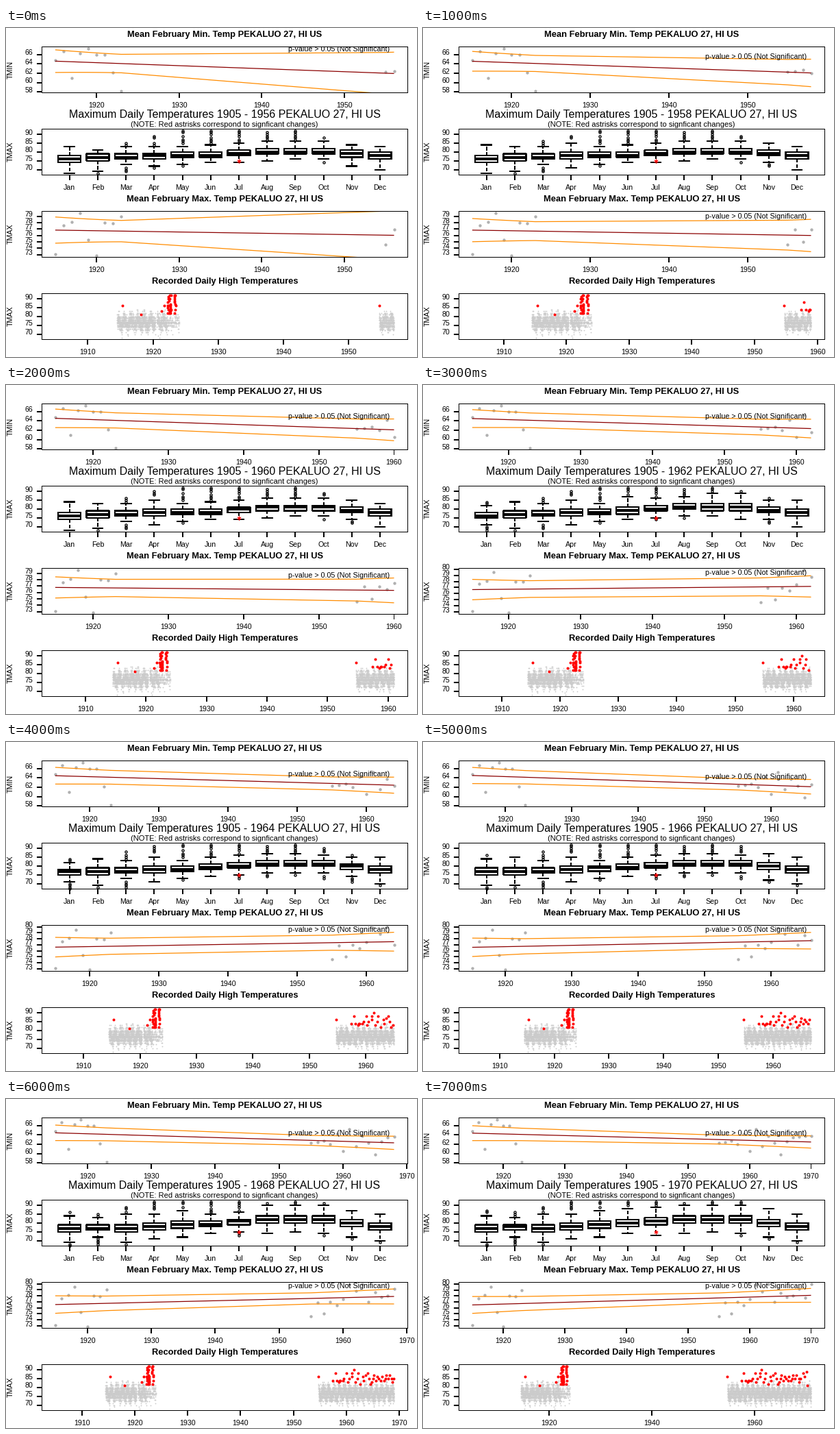
A matplotlib script that plays this animation: 600 by 480 pixels, repeating every 8000 ms.

```python
import numpy as np
import matplotlib.pyplot as plt
from matplotlib.animation import FuncAnimation
from matplotlib.patches import Rectangle

W, H, DPI = 600, 480, 100
PT = 72 / DPI  # points per pixel
LEFT, RIGHT, TALL = 52.5, 586.5, 67
X0, X1 = 71.9, 566.5  # data span inside the 4 % padding
PLACE = "PEKALUO 27, HI US"
MONTHS = "Jan Feb Mar Apr May Jun Jul Aug Sep Oct Nov Dec".split()

plt.rcParams["font.family"] = "Liberation Sans"
plt.rcParams["path.snap"] = False

fig = plt.figure(figsize=(W / DPI, H / DPI), dpi=DPI, facecolor="white")
ax = fig.add_axes([0, 0, 1, 1])


def bump(x, centre, width):
    return np.exp(-((x - centre) / width) ** 2)


# February means: nine early readings, then rules for the later years
K = np.arange(16)
FEB_YEARS = np.concatenate([np.arange(1915, 1924), 1955 + K])
TMIN = np.concatenate([
    [64.8, 66.7, 61, 66.2, 67.3, 66, 65.9, 62.1, 58.2],
    62.3 + 0.1 * K + 2.4 * (-1.0) ** K * bump(K, 5.5, 2.2) - 3.6 * bump(K, 10, 0.8)])
TMAX = np.concatenate([
    [73.1, 77.6, 78.1, 79.5, 75.3, 72.9, 78, 77.9, 79],
    75.6 + 0.22 * K + 1.1 * np.cos(6 * np.pi * (K - 1) / 7) + 2.7 * bump(K, 6.7, 1.7)])


def daily_readings():
    rng = np.random.default_rng(7)
    t = np.concatenate([np.arange(1914.5, 1924, 1 / 365),
                        np.arange(1954.75, 1971, 1 / 365)])
    season = 1.5 * np.cos(2 * np.pi * (t - 0.62))
    v = np.round(76.8 + season + rng.normal(0, 2.2, t.size)).clip(67, 84)
    sparse = (t > 1922.1) & (t < 1930)
    keep = np.where(sparse, 0.25, 0.75) > rng.random(t.size)
    keep &= ~((t > 1920.35) & (t < 1920.6))
    return t[keep], v[keep]


def record_highs():
    rng = np.random.default_rng(3)
    lone = [(1915.35, 86), (1918.1, 81), (1921.3, 83), (1921.75, 86), (1954.7, 86)]
    hot = [(c + rng.uniform(-0.04, 0.04), v)
           for c in (1922.3, 1922.42, 1922.55, 1922.7, 1923.3, 1923.45)
           for v in range(82, 93) if rng.random() < 0.5]
    late = [(t, round(rng.triangular(81, 85, 90)))
            for t in np.linspace(1957.6, 1970.3, 44) + rng.uniform(-0.2, 0.2, 44)]
    return np.array(lone + hot + late).T


DAY_T, DAY_V = daily_readings()
HIGH_T, HIGH_V = record_highs()
PRESENT = np.random.default_rng(5).random((12, 100)) < 0.82


def text(x, y, s, size, **kw):
    kw = {"ha": "center", "va": "baseline", **kw}
    return ax.text(x, y, s, fontsize=size * PT, **kw)


def line(x, y, color="black", width=1, aa=False, **kw):
    kw = {"solid_capstyle": "butt", **kw}
    return ax.plot(x, y, color=color, lw=width * PT, aa=aa, **kw)[0]


def dots(x, y, color, size):
    return ax.plot(x, y, "o", color=color, ms=size * PT, mew=0)[0]


def panel(top, label):
    """Draw the frame of a panel and return it for clipping."""
    box = Rectangle((LEFT, top + 0.5), RIGHT - LEFT, TALL, fill=False,
                    lw=PT, ec="black", aa=False, zorder=5)
    ax.add_patch(box)
    text(11.5, top + 33.5, label, 10.6, rotation=90, va="center", ha="right")
    return box


def x_axis(top, ticks, labels):
    for x, s in zip(ticks, labels):
        line([x, x], [top + 67.5, top + 74.5])
        text(x, top + 89, s, 10.6)


def value_axis(top, lo, hi, ticks):
    """Ticks on the left side; returns the mapping to pixels."""
    to_y = lambda v: top + 64.8 - (v - lo) * 61.9 / (hi - lo)
    for v in ticks:
        y = to_y(v)
        line([45.5, LEFT], [y, y])
        text(39, y + 0.6, str(v), 10.6, ha="right")
    return to_y


def year_axis(top, first, last):
    """Decade ticks over the padded range; returns the mapping to pixels."""
    scale = (X1 - X0) / (last - first)
    pad = 0.04 * (last - first)
    raw = (last - first + 2 * pad) / 5
    step = 20 if 20 - raw < 1.5 * (raw - 10) else 10
    ticks = [t for t in range(1900, 1990, step) if first - pad <= t <= last + pad]
    x_axis(top, [X0 + (t - first) * scale for t in ticks], ticks)
    return lambda t: X0 + (t - first) * scale


def t_quantile(df, z=1.96):
    return (z + (z**3 + z) / (4 * df)
            + (5 * z**5 + 16 * z**3 + 3 * z) / (96 * df**2))


def fit(x, v):
    """Least squares line with the half width of its 95 % band."""
    slope, base = np.polyfit(x - 1900, v, 1)
    mid = base + slope * (x - 1900)
    n, dx = len(x), x - x.mean()
    s = np.sqrt(((v - mid) ** 2).sum() / (n - 2))
    return mid, t_quantile(n - 2) * s * np.sqrt(1 / n + dx**2 / (dx**2).sum())


def trend(top, kind, data, year, step):
    text(319.5, top - 14, f"Mean February {kind}. Temp {PLACE}", 12.85, weight="bold")
    box = panel(top, "T" + kind.upper())
    used = FEB_YEARS <= year
    years, v = FEB_YEARS[used], data[used]
    lo, hi = v.min(), v.max()
    pad = 0.04 * (hi - lo)
    first = int(np.ceil(lo - pad))
    to_x = year_axis(top, 1915, year)
    to_y = value_axis(top, lo, hi, range(first, int(hi + pad) + 1, step))
    mid, half = fit(years, v)
    x = to_x(years)
    parts = [dots(x, to_y(v), "#b0b0b0", 4.4)]
    for curve, color in ((mid, "#8b0000"), (mid + half, "#ff8c00"),
                         (mid - half, "#ff8c00")):
        parts.append(line(x, to_y(curve), color, 1.25, aa=True))
    parts.append(text(486.5, to_y(mid + half)[-1] - 0.8,
                      "p-value > 0.05 (Not Significant)", 10.6,
                      zorder=4, clip_on=True))
    for p in parts:
        p.set_clip_path(box)


def month_stats(m, year):
    """Quartiles and readings of a month, drifting warmer over the years."""
    p = (year - 1956) / 14
    knots = [0, 1, 2, 5, 7, 9, 11]
    early = np.interp(m, knots, [76, 77, 77.3, 78, 80, 80, 78])
    late = np.interp(m, knots, [77, 77.5, 77.2, 79.6, 82, 82, 78])
    med = early + (late - early) * p
    drop = (1.7 - 0.6 * np.sin(np.pi * m / 11)) * (1 + 0.3 * p)
    low = np.interp(m, [0, 2, 5, 8, 11], [68, 69, 73, 76, 70]) - p
    high = np.interp(m, [0, 1, 4, 8, 10, 11], [83, 82, 92, 92, 84, 83]) + 4 * p
    values = np.arange(round(low), min(92, round(high)) + 1)
    return np.round([med - drop, med, med + 1.9]), values[PRESENT[m, values]]


def box_plot(x, quartiles, values, to_y):
    q1, med, q3 = quartiles
    reach = 1.5 * (q3 - q1)
    inside = (values >= q1 - reach) & (values <= q3 + reach)
    for a, b in ((q1, values[inside].min()), (q3, values[inside].max())):
        line([x, x], [to_y(a), to_y(b)], width=1.2, dashes=(4, 3))
        line([x - 8, x + 8], [to_y(b)] * 2, width=1.2)
    ax.add_patch(Rectangle((x - 16.5, to_y(q3)), 33, to_y(q1) - to_y(q3), aa=False,
                           fc="white", ec="black", lw=1.2 * PT, zorder=3))
    line([x - 16.5, x + 16.5], [to_y(med)] * 2, width=3, zorder=4)
    out = values[~inside]
    ax.plot([x] * len(out), to_y(out), "o", mfc="none", mec="black",
            ms=3.2 * PT, mew=1.3 * PT)


def monthly(year):
    top = 147
    text(319, 131, f"Maximum Daily Temperatures 1905 - {year} {PLACE}", 16)
    text(319, 144, "(NOTE: Red astrisks correspond to signficant changes)", 11.1)
    panel(top, "TMAX")
    to_y = value_axis(top, 68, 92, range(70, 91, 5))
    xs = 92.8 + 41.2 * np.arange(12)
    x_axis(top, xs, MONTHS)
    for m, x in enumerate(xs):
        box_plot(x, *month_stats(m, year), to_y)
    ax.plot(xs[6], 194, marker=(6, 2, 0), ms=6 * PT, mec="red", mew=PT, zorder=6)


def daily(year):
    top = 387
    text(319.5, 373, "Recorded Daily High Temperatures", 12.85, weight="bold")
    box = panel(top, "TMAX")
    to_y = value_axis(top, 68, 92, range(70, 91, 5))
    to_x = year_axis(top, 1905, year + 1)
    for t, v, color, size in ((DAY_T, DAY_V, "#cbcbcb", 1.8),
                              (HIGH_T, HIGH_V, "red", 4)):
        seen = t < year + 1
        dots(to_x(t[seen]), to_y(v[seen]), color, size).set_clip_path(box)


def draw(i):
    year = 1956 + 2 * i
    ax.clear()
    ax.set(xlim=(0, W), ylim=(H, 0))
    ax.axis("off")
    trend(27, "Min", TMIN, year, 2)
    monthly(year)
    trend(267, "Max", TMAX, year, 1)
    daily(year)
    return []


anim = FuncAnimation(fig, draw, frames=8, interval=1000, repeat=True, repeat_delay=0)
plt.show()
```
